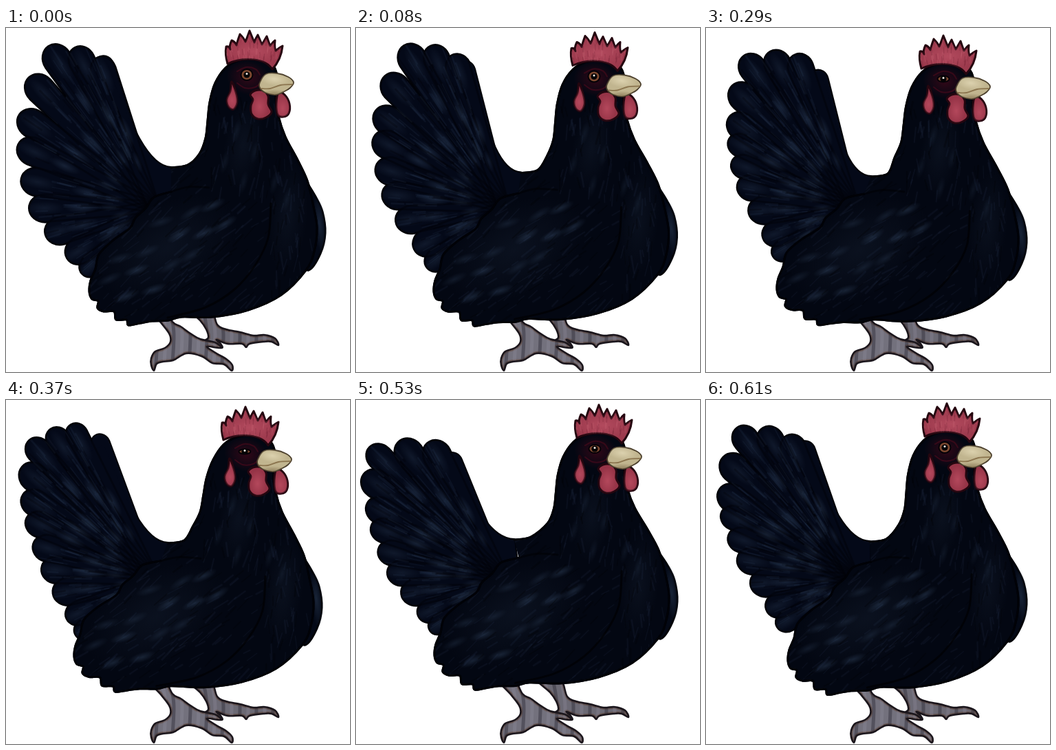
These frames come from a looping animation (500x500 px, 690 ms). An HTML page with a canvas:

```html
<!DOCTYPE html>
<html lang="en">
<head>
<meta charset="utf-8">
<title>Hen</title>
<style>
html, body { margin: 0; width: 100%; height: 100%; overflow: hidden; background: #fff; }
canvas { display: block; width: 100vw; height: 100vh; }
</style>
</head>
<body>
<canvas id="stage" width="500" height="500"></canvas>
<script>
const ctx = document.getElementById('stage').getContext('2d');
const INK = '#010207';
const LOOP = 690;
const STARTS = [0, 80, 160, 290, 370, 450, 530, 610];
const PIVOT = [215, 260];
const LOBES = [0, .5, 1, 1.55, 2, 2.33, 2.67, 3, 3.33, 3.67, 4];

// tail: right shoulder, five feather tips, saddle
// move: offsets of wing, breast, face, comb
const pose = (tail, move, eye) => ({ tail, move, eye });
const up = pose(
  [[148,56],[134,43],[62,27],[20,126],[34,262],[111,357],[240,203]],
  [[0,0],[0,0],[0,0],[0,0]], 1);
const low = pose(
  [[183,70],[150,35],[78,25],[38,115],[43,220],[96,339],[240,218]],
  [[-16,0],[5,13],[-8,5],[-14,5]], 1);
const rise = pose(
  [[170,76],[130,39],[55,41],[34,130],[46,228],[98,332],[240,216]],
  [[-18,-3],[2,14],[-5,6],[-9,7]], .55);
const back = pose(
  [[142,65],[95,36],[34,59],[25,138],[52,245],[102,342],[235,208]],
  [[-22,-10],[-5,4],[-3,7],[-6,6]], .45);
const open = pose(
  [[145,92],[107,61],[20,69],[17,150],[46,250],[108,335],[230,203]],
  [[-7,-12],[3,-5],[-3,3],[-1,3]], .75);
const settle = pose(
  [[150,75],[118,52],[45,41],[20,130],[46,230],[104,330],[238,206]],
  [[-2,-4],[2,-1],[-3,1],[-4,1]], 1);

const mix = (a, b, t) => a + (b - a) * t;
const mixPt = (a, b, t) => [mix(a[0], b[0], t), mix(a[1], b[1], t)];
const add = (p, x, y) => [p[0] + x, p[1] + y];
const clamp = t => Math.max(0, Math.min(1, t));
const halfway = (a, b) => pose(
  a.tail.map((p, i) => mixPt(p, b.tail[i], .5)),
  a.move.map((p, i) => mixPt(p, b.move[i], .5)),
  (a.eye + b.eye) / 2);

const POSES = [up, halfway(up, low), low, rise, back, halfway(back, open), open, settle];

function random(seed) {
  return () => (seed = (seed * 16807) % 2147483647) / 2147483647;
}

// Smooth path through points
function spline(pts, closed) {
  const n = pts.length, path = new Path2D();
  const at = i => closed ? pts[(i + n) % n] : pts[Math.max(0, Math.min(n - 1, i))];
  path.moveTo(...pts[0]);
  for (let i = 0; i < (closed ? n : n - 1); i++) {
    const [a, b, c, d] = [at(i - 1), at(i), at(i + 1), at(i + 2)];
    path.bezierCurveTo(b[0] + (c[0] - a[0]) / 6, b[1] + (c[1] - a[1]) / 6,
      c[0] - (d[0] - b[0]) / 6, c[1] - (d[1] - b[1]) / 6, c[0], c[1]);
  }
  if (closed) path.closePath();
  return path;
}

function paint(path, fill, line = INK, width = 3) {
  ctx.fillStyle = fill;
  ctx.fill(path);
  stroke(path, line, width);
}

function stroke(path, color, width) {
  ctx.strokeStyle = color;
  ctx.lineWidth = width;
  ctx.stroke(path);
}

function inside(path, draw) {
  ctx.save();
  ctx.clip(path);
  draw();
  ctx.restore();
}

function glow(x, y, rx, ry, angle, rgb, alpha) {
  ctx.save();
  ctx.translate(x, y);
  ctx.rotate(angle);
  ctx.scale(rx, ry);
  const g = ctx.createRadialGradient(0, 0, 0, 0, 0, 1);
  g.addColorStop(0, `rgba(${rgb},${alpha})`);
  g.addColorStop(1, `rgba(${rgb},0)`);
  ctx.fillStyle = g;
  ctx.fillRect(-1, -1, 2, 2);
  ctx.restore();
}

function tipAt(anchors, u) {
  const i = Math.min(3, Math.floor(u)), t = u - i;
  const [a, b, c, d] = [-1, 0, 1, 2].map(k => anchors[Math.max(0, Math.min(4, i + k))]);
  return [0, 1].map(k => .5 * (2 * b[k] + (c[k] - a[k]) * t +
    (2 * a[k] - 5 * b[k] + 4 * c[k] - d[k]) * t * t +
    (3 * b[k] - a[k] - 3 * c[k] + d[k]) * t * t * t));
}

function feather(tip, r) {
  const path = new Path2D();
  const a = Math.atan2(tip[1] - PIVOT[1], tip[0] - PIVOT[0]);
  const c = Math.cos(a), s = Math.sin(a);
  const x = tip[0] - c * r * 1.15, y = tip[1] - s * r * 1.15;
  path.moveTo(PIVOT[0] + s * 8, PIVOT[1] - c * 8);
  path.lineTo(x + s * r, y - c * r);
  path.ellipse(x, y, r * 1.15, r, a, -Math.PI / 2, Math.PI / 2);
  path.lineTo(PIVOT[0] - s * 8, PIVOT[1] + c * 8);
  path.closePath();
  return path;
}

function drawTail(tail) {
  const [edge, ...rest] = tail, anchors = rest.slice(0, 5), saddle = rest[5];
  const tips = LOBES.map(u => tipAt(anchors, u));
  const whole = new Path2D();
  const parts = tips.map((p, i) => {
    const a = tips[Math.max(0, i - 1)], b = tips[Math.min(10, i + 1)];
    const gap = Math.hypot(a[0] - b[0], a[1] - b[1]) / (i % 10 ? 2 : 1);
    return feather(p, Math.max(13, Math.min(20, gap * .5)));
  });
  parts.push(feather(add(edge, -10, -14), 13));
  const bulk = new Path2D();
  bulk.moveTo(...edge);
  bulk.bezierCurveTo(edge[0] + 15, edge[1] + 30, saddle[0] - 45, saddle[1] - 1, ...saddle);
  bulk.lineTo(240, 280);
  bulk.lineTo(...mixPt(PIVOT, tips[10], .8));
  bulk.lineTo(...mixPt(PIVOT, tips[5], .75));
  bulk.lineTo(...mixPt(PIVOT, tips[2], .8));
  bulk.closePath();
  parts.push(bulk);
  parts.forEach(p => { whole.addPath(p); stroke(p, INK, 4); });
  ctx.fillStyle = '#040918';
  parts.forEach(p => ctx.fill(p));

  const rnd = random(41);
  inside(whole, () => {
    parts.slice(0, 11).forEach(p => stroke(p, 'rgba(0,1,6,.4)', 3));
    tips.forEach((p, i) => {
      const a = Math.atan2(p[1] - PIVOT[1], p[0] - PIVOT[0]);
      const spot = (r, rx, ry, alpha) => glow(...mixPt(PIVOT, p, r), rx, ry, a, '58,80,110', alpha);
      spot(.88, 30, 10, .22);
      spot(.5 + .08 * (i % 3), 25, 8, .34);
      spot(.3 + .05 * (i % 2), 17, 6, .22);
    });
    for (let i = 0; i < 230; i++) {
      const tip = tipAt(anchors, rnd() * 4), r = .25 + rnd() * .65;
      const line = spline([mixPt(PIVOT, tip, r), mixPt(PIVOT, tip, r + .08 + rnd() * .08)]);
      stroke(line, i % 3 ? 'rgba(70,95,128,.11)' : 'rgba(0,0,8,.3)', 1 + rnd() * 2);
    }
  });
}

function drawLeg(pts, tone) {
  const path = spline(pts, true);
  paint(path, tone, '#17131a', 2.5);
  inside(path, () => {
    stroke(path, 'rgba(92,64,52,.55)', 6);
    for (let i = 0; i < 17; i++) {
      const x = 207 + i * 12;
      const band = spline([[x - 4, 410], [x + 1, 445], [x - 2, 500]]);
      stroke(band, i % 2 ? 'rgba(45,43,55,.45)' : 'rgba(146,144,158,.3)', 5);
    }
    stroke(path, '#17131a', 2.5);
  });
}

function drawLegs() {
  drawLeg([[262,405],[282,425],[291,438],[294,450],[288,457],[313,465],[312,459],[306,453],
    [322,459],[343,459],[349,464],[354,459],[374,456],[386,456],[396,461],[391,451],
    [375,446],[360,447],[340,442],[320,438],[307,431],[296,405]], '#6b6974');
  drawLeg([[203,403],[224,427],[237,444],[239,456],[231,465],[217,470],[211,480],[211,490],
    [215,498],[219,488],[228,485],[243,483],[262,473],[284,477],[300,487],[317,489],
    [328,498],[329,490],[320,481],[306,473],[292,463],[312,465],[304,457],[282,452],
    [268,444],[254,434],[242,427],[228,403]], '#73717d');
}

function drawBody({ tail, move }) {
  const [wing, breast, face] = move, saddle = tail[6];
  const at = ([x, y]) => {
    const w = clamp((250 - y) / 170);
    const base = mixPt(wing, breast, clamp((x - 130) / 310));
    return add(mixPt(base, face, w), x, y);
  };
  const bend = (pts, closed) => spline(pts.map(at), closed);

  const flank = bend([[436,222],[450,245],[460,267],[464,298],[457,328],[440,352],[420,340]]);
  paint(flank, '#040916');
  glow(...at([456,285]), 9, 42, -.1, '58,80,110', .38);

  const outline = [saddle, add(saddle, 24, -4), ...[
    [281,183],[290,160],[293,135],[296,108],[304,80],[319,58],[338,47],[365,44],[386,52],
    [394,70],[392,100],[396,128],[406,158],[424,192],[438,222],[446,255],[452,290],[448,325],
    [436,352],[400,388],[352,410],[300,420],[255,420],[236,425],[212,426],[195,429],[178,432],
    [175,424],[160,424],[157,412],[142,412],[133,407],[134,397],[125,394],[121,383],[123,367],
    [130,350],[135,329],[155,309],[180,291],[188,276],[203,262],[215,246],[240,238]
  ].map(at)];
  const path = spline(outline);
  paint(path, '#030712');

  inside(path, () => {
    const spot = (x, y, rx, ry, a, alpha) => glow(...at([x, y]), rx, ry, a, '58,80,110', alpha);
    spot(235, 320, 110, 65, -.5, .14);
    spot(345, 170, 28, 65, .15, .13);
    spot(410, 275, 28, 80, .1, .12);
    [[270,268],[300,258],[225,282],[252,300],[205,325],[190,352],[240,345],[288,298],[165,335],
     [318,285],[150,365],[215,380],[270,330],[175,390]].forEach(([x, y], i) =>
      spot(x, y, 21, 7, -.55 + (i % 3) * .12, .24 + (i % 2) * .12));
    [[335,150],[362,180],[318,195],[390,225],[408,250],[345,225]].forEach(([x, y]) =>
      spot(x, y, 6, 18, .25, .17));
    const rnd = random(97);
    for (let i = 0; i < 420; i++) {
      const x = 130 + rnd() * 320, y = 100 + rnd() * 320;
      const neck = x > 295 && y < 240 || x > 385;
      const a = neck ? 1.9 - rnd() * .6 : 2.65 - rnd() * .4;
      const len = 9 + rnd() * 16;
      const line = bend([[x, y], [x + Math.cos(a) * len, y + Math.sin(a) * len]]);
      stroke(line, i % 3 ? 'rgba(70,95,128,.09)' : 'rgba(0,0,6,.3)', 1 + rnd() * 2);
    }
    stroke(bend([[385,255],[381,305],[362,345],[332,380],[290,406],[235,421]]), 'rgba(0,0,3,.75)', 3);
    stroke(bend([[240,238],[265,231],[295,232]]), 'rgba(0,0,3,.5)', 3);
  });
  stroke(path, INK, 3);
}

function drawWattle(pts) {
  const path = spline(pts, true);
  paint(path, '#963447', '#24060f', 3);
  inside(path, () => {
    const x = pts.reduce((s, p) => s + p[0], 0) / pts.length;
    const y = pts.reduce((s, p) => s + p[1], 0) / pts.length;
    glow(x, y + 4, 13, 20, 0, '192,80,100', .7);
  });
}

function drawComb() {
  const tips = [[320,27],[328,18],[340,9],[354,4],[366,10],[379,12],[391,18],[402,26]];
  const notches = [[326,31],[335,25],[348,20],[361,21],[372,24],[384,26],[392,33]];
  const path = new Path2D();
  path.moveTo(322, 52);
  path.quadraticCurveTo(318, 38, ...tips[0]);
  notches.forEach((n, i) => {
    const t = tips[i + 1];
    path.quadraticCurveTo(n[0] - 2, n[1] - 5, ...n);
    path.quadraticCurveTo(t[0] - 4, n[1] - 5, ...t);
  });
  path.quadraticCurveTo(400, 46, 387, 60);
  path.bezierCurveTo(378, 45, 348, 40, 322, 52);
  path.closePath();
  paint(path, '#9c3a4d', '#24060f', 3);
  inside(path, () => {
    glow(360, 34, 42, 20, 0, '190,82,102', .65);
    const rnd = random(13);
    for (let i = 0; i < 60; i++) {
      const x = 322 + rnd() * 76, y = 14 + rnd() * 36;
      stroke(spline([[x, y], [x + (x - 360) * .05, y - 8]]), i % 2 ? 'rgba(90,20,40,.22)' : 'rgba(215,120,135,.18)', 1.3);
    }
  });
}

function drawEye(open) {
  glow(352, 72, 32, 25, .2, '72,8,26', .65);
  stroke(spline([[336,80],[347,87],[362,86],[372,78]]), 'rgba(75,10,28,.65)', 2);
  stroke(spline([[336,63],[349,57],[363,60],[369,68]]), 'rgba(75,10,28,.6)', 2);
  const lens = new Path2D();
  lens.ellipse(350, 68, 8.5, 8 * open, 0, 0, 7);
  paint(lens, '#7d4930', '#050207', 2);
  inside(lens, () => {
    ctx.fillStyle = '#040305';
    ctx.beginPath();
    ctx.arc(350, 68, 4.6, 0, 7);
    ctx.fill();
    ctx.fillStyle = '#f4efe6';
    ctx.beginPath();
    ctx.arc(350, 66.5, 1.5, 0, 7);
    ctx.fill();
  });
}

function drawBeak() {
  const path = spline([[369,79],[378,67],[394,66],[410,71],[418,79],[413,87],[405,92],
    [392,97],[377,94],[369,87]], true);
  paint(path, '#c1b58f', '#4b3f2c', 1.8);
  inside(path, () => {
    glow(390, 74, 22, 10, .15, '226,216,182', .8);
    glow(390, 95, 24, 6, 0, '130,112,78', .6);
  });
  stroke(spline([[371,88],[384,88],[399,83],[416,82]]), '#8b754f', 1.8);
}

function drawHead({ move, eye }) {
  const [, , face, comb] = move;
  ctx.save();
  ctx.translate(...comb);
  drawComb();
  ctx.restore();
  ctx.save();
  ctx.translate(...face);
  drawEye(eye);
  drawWattle([[396,94],[405,97],[412,110],[411,124],[403,129],[395,126],[393,110]]);
  drawWattle([[328,78],[334,93],[336,108],[331,118],[324,115],[321,104],[326,92]]);
  drawWattle([[362,91],[374,91],[381,99],[381,111],[386,122],[378,130],[366,132],[357,125],
    [356,113],[359,104],[355,97]]);
  drawBeak();
  ctx.restore();
}

function frame(now) {
  const t = now % LOOP;
  const p = POSES[STARTS.filter(s => s <= t).length - 1];
  ctx.fillStyle = '#fff';
  ctx.fillRect(0, 0, 500, 500);
  ctx.lineJoin = ctx.lineCap = 'round';
  drawTail(p.tail);
  drawLegs();
  drawBody(p);
  drawHead(p);
  requestAnimationFrame(tick);
}

let start;
function tick(now) {
  start ??= now;
  frame(Math.max(0, now - start));
}
requestAnimationFrame(tick);
</script>
</body>
</html>
```
